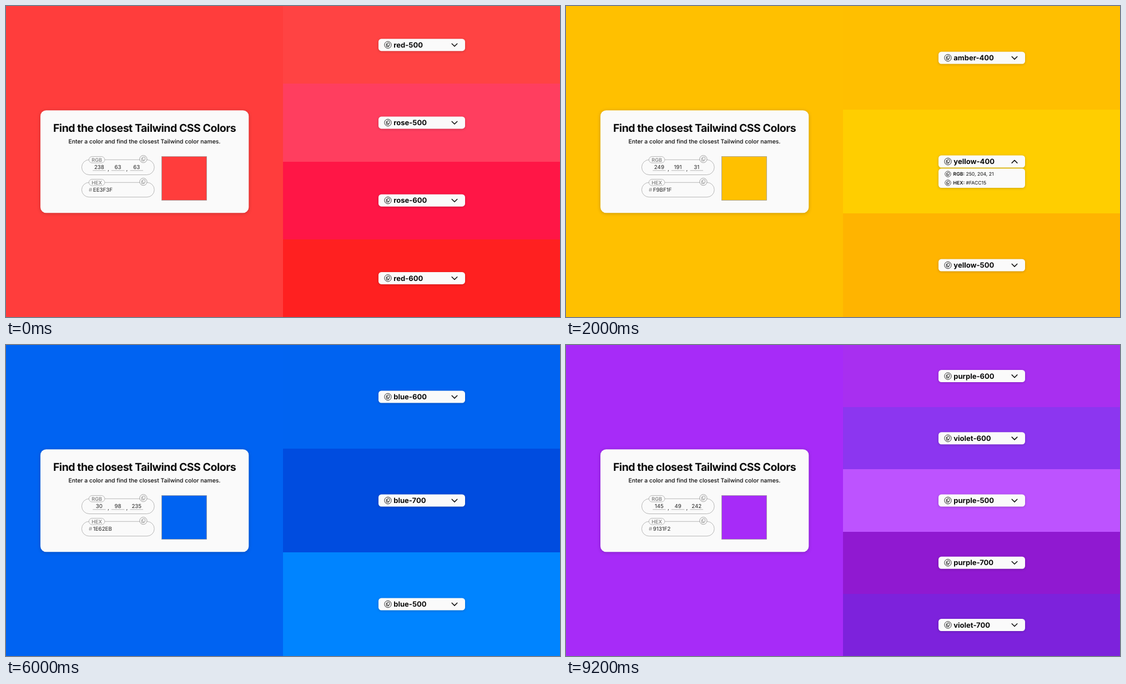
An HTML page that plays this animation: 998 by 561 pixels, repeating every 10000 ms.

```html
<!DOCTYPE html>
<html lang="en">
<head>
<meta charset="utf-8">
<title>Closest Tailwind CSS Colors</title>
<style>
  html, body { margin: 0; width: 100%; height: 100%; overflow: hidden; }
  svg { display: block; width: 100vw; height: 100vh; }
  text {
    font-family: Inter, "Liberation Sans", sans-serif;
    font-optical-sizing: none;
    text-rendering: geometricPrecision;
    fill: #0a0a0a;
  }
  .paper { fill: #fafafa; }
  .line { fill: none; stroke: #a0a0a0; stroke-width: .75; }
  .line.paper { fill: #fafafa; }
  .icon { fill: none; stroke: #111; stroke-width: .85; stroke-linejoin: round; }
  .icon.soft { stroke: #858585; stroke-width: .7; }
  .chevron { fill: none; stroke: #0a0a0a; stroke-width: 1.5; stroke-linecap: round; stroke-linejoin: round; }
  .title { font-size: 19.5px; font-weight: 700; letter-spacing: -.025em; }
  .sub { font-size: 10.4px; font-weight: 500; }
  .badge { font-size: 9.1px; font-weight: 600; fill: #8a8a8a; }
  .value { font-size: 9.75px; fill: #262626; }
  .muted { fill: #8a8a8a; }
  .name { font-size: 13px; font-weight: 700; }
  .detail { font-size: 8.6px; }
  .detail tspan { font-weight: 600; }
  .mid { text-anchor: middle; }
  .card { filter: drop-shadow(0 1.5px 3px rgba(0, 0, 0, .22)); }
  .pill { filter: drop-shadow(0 1px 2px rgba(0, 0, 0, .2)); }
</style>
</head>
<body>
<svg id="stage" viewBox="0 0 998 561" preserveAspectRatio="none"></svg>
<script>
const W = 998, H = 561, SPLIT = 499, HOLD = 2000;

// bands: [name, fill, open hex]
const scenes = [
  { hex: 'EE3F3F', fill: '#ff3d3c', bands: [
    ['red-500', '#ff4343'], ['rose-500', '#ff3e5f'],
    ['rose-600', '#ff1646'], ['red-600', '#ff2020']] },
  { hex: 'F9BF1F', fill: '#ffc000', bands: [
    ['amber-400', '#ffbf00'], ['yellow-400', '#ffce00', 'FACC15'],
    ['yellow-500', '#ffb400']] },
  { hex: '3ADF81', fill: '#00e47e', bands: [
    ['green-400', '#00e37d'], ['emerald-400', '#00d69b'],
    ['green-500', '#00c851']] },
  { hex: '1E62EB', fill: '#0063f2', bands: [
    ['blue-600', '#0063f1'], ['blue-700', '#004cdf'],
    ['blue-500', '#0084ff']] },
  { hex: '9131F2', fill: '#a72bf8', bands: [
    ['purple-600', '#a82ff0'], ['violet-600', '#8c36f0'],
    ['purple-500', '#bd53ff'], ['purple-700', '#9019d1'],
    ['violet-700', '#7d22dc']] }
];

const toRgb = hex => hex.match(/../g).map(h => parseInt(h, 16));

const rect = (x, y, w, h, r, attrs) =>
  `<rect x="${x}" y="${y}" width="${w}" height="${h}" rx="${r}" ${attrs}/>`;

const text = (x, y, cls, str) => `<text x="${x}" y="${y}" class="${cls}">${str}</text>`;

const copyIcon = (x, y, scale = 1, cls = '') =>
  `<g class="icon ${cls}" transform="translate(${x} ${y}) scale(${scale})">
    <circle r="6.2" fill="#fafafa"/>
    <rect x="-1.4" y="-3.4" width="4.3" height="5.1" rx=".8"/>
    <path d="M-1.4-1.8H-2.8V3.3H1.3V1.7"/>
  </g>`;

const field = (y, h, label) =>
  rect(136.4, y, 130.8, h, h / 2, 'class="line"') +
  rect(149.3, y - 5.7, 28.6, 11.4, 5.7, 'class="line paper"') +
  text(163.6, y + 3.3, 'badge mid', label) +
  copyIcon(247.4, y - 1.2, 1.06, 'soft');

function card({ hex, fill }) {
  const numbers = toRgb(hex).map((n, i) => {
    const x = 167.9 + i * 33.7;
    const comma = i < 2 ? text(x + 16.4, 297, 'value mid', ',') : '';
    return text(x, 294, 'value mid', n) + comma +
      `<path class="line" d="M${x - 11.7} 296.8h23.4"/>`;
  }).join('');
  return rect(62, 188.3, 375.3, 185, 10.4, 'class="paper card"') +
    text(249.5, 227.3, 'title mid', 'Find the closest Tailwind CSS Colors') +
    text(249.5, 248.1, 'sub mid', 'Enter a color and find the closest Tailwind color names.') +
    field(277.3, 27.2, 'RGB') + numbers +
    field(318.3, 26.4, 'HEX') +
    text(149, 335, 'value muted', '#') + text(156.8, 335, 'value', hex) +
    rect(280.4, 271.4, 81, 79, 0, `fill="${fill}" stroke="#999" stroke-width=".8"`);
}

function details(y, hex) {
  const row = (dy, label, value) => copyIcon(688, y + dy, .84) +
    text(697.6, y + dy + 3.1, 'detail', `<tspan>${label}:</tspan> ${value}`);
  return rect(671, y + 12.8, 156, 34.6, 5.2, 'class="paper pill"') +
    row(22.6, 'RGB', toRgb(hex).join(', ')) +
    row(38.4, 'HEX', '#' + hex);
}

function band([name, fill, open], i, all) {
  const h = H / all.length, y = h * (i + .5), flip = open ? -1 : 1;
  return rect(SPLIT, h * i, W - SPLIT, h + 1, 0, `fill="${fill}" shape-rendering="crispEdges"`) +
    rect(671, y - 11, 156, 22, 5.2, 'class="paper pill"') +
    copyIcon(688, y) +
    text(698.3, y + 4.7, 'name', name) +
    `<path class="chevron" transform="translate(808 ${y + .2}) scale(1 ${flip})" d="M-4.8-2.4L0 2.4L4.8-2.4"/>` +
    (open ? details(y, open) : '');
}

const stage = document.getElementById('stage');
stage.innerHTML = scenes.map(s =>
  `<g>${rect(0, 0, W, H, 0, `fill="${s.fill}"`)}${s.bands.map(band).join('')}${card(s)}</g>`
).join('');

const groups = [...stage.children];
const start = performance.now();

function draw() {
  const now = Math.floor((performance.now() - start) / HOLD) % scenes.length;
  groups.forEach((g, i) => g.style.display = i === now ? '' : 'none');
  requestAnimationFrame(draw);
}
draw();
</script>
</body>
</html>
```
